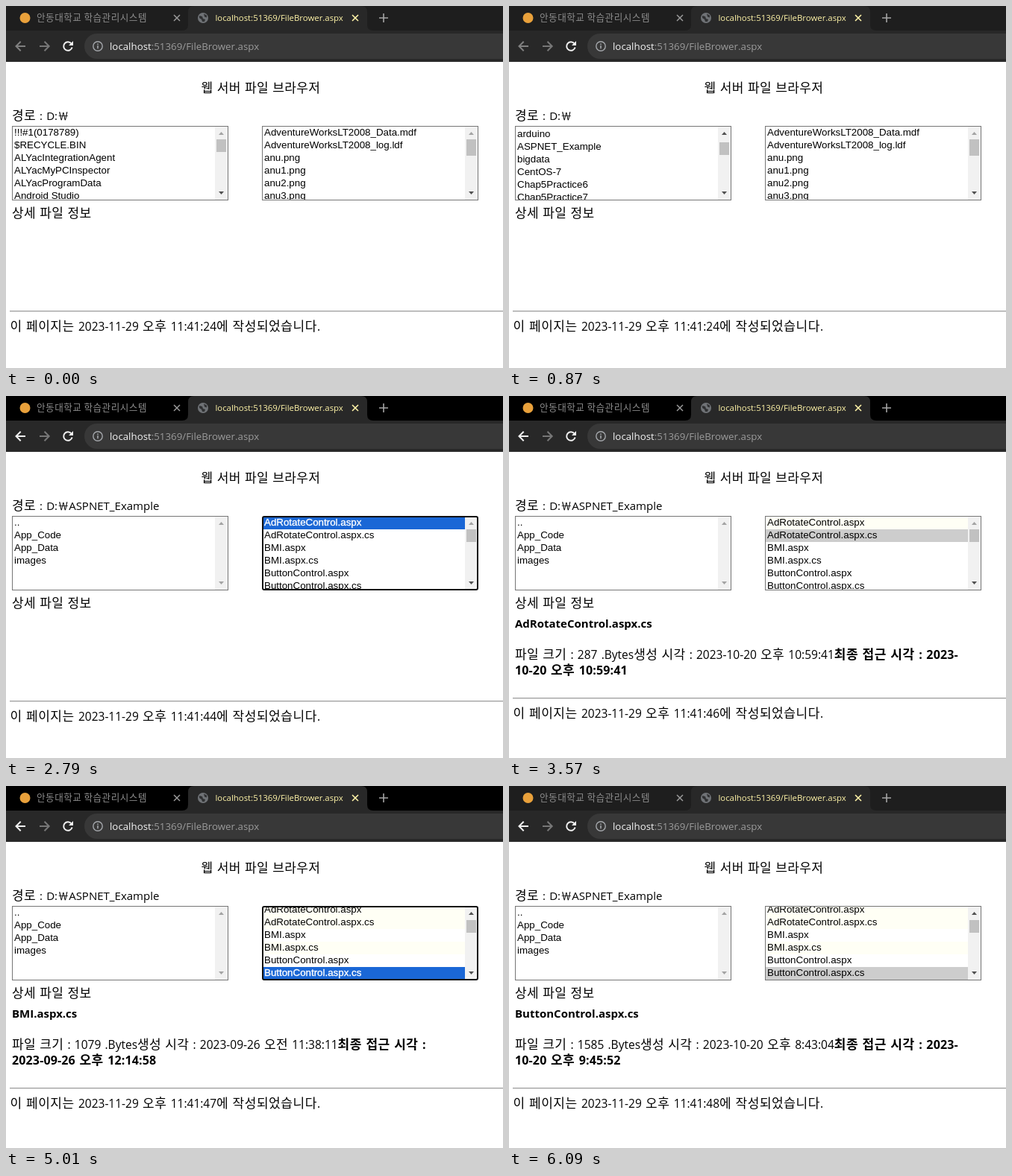
Recreate the animation shown at these times as an HTML page. Size 666 by 486 pixels, loop 6.21 s.

```html
<!DOCTYPE html>
<html lang="ko">
<head>
<meta charset="utf-8">
<title>FileBrower</title>
<style>
  html, body { margin: 0; width: 100%; height: 100%; overflow: hidden; background: #fff; }
  svg { display: block; }
  text { white-space: pre; font: 15.5px "Open Sans", "Noto Sans", sans-serif; word-spacing: 1.2px; }
  .k { font-family: "Noto Sans CJK KR", "Noto Sans CJK", sans-serif; font-size: 17px; font-weight: 350; letter-spacing: .36px; }
  .won { font-family: "Noto Sans CJK KR", "Noto Sans CJK", sans-serif; font-size: 15px; font-weight: 350; }
  .path { font-size: 15px; }
  .foot .k { letter-spacing: .55px; }
  .b { font-weight: 700; font-size: 16px; letter-spacing: .15px; }
  .b .k { font-weight: 700; letter-spacing: .5px; }
  .name { font-weight: 700; font-size: 15px; }
  .row { font: 13.333px "Liberation Sans", Arial, sans-serif; word-spacing: 0; }
  .on { fill: #fff; stroke: #fff; stroke-width: .35px; }
  .url { font-size: 13.3px; word-spacing: 0; }
  .tab { font-size: 11.4px; word-spacing: 0; }
  .tab .k { font-size: 12.6px; letter-spacing: .5px; }
  .ico { fill: none; stroke-width: 2; }
</style>
</head>
<body>
<svg id="stage" width="666" height="486" viewBox="0 0 666 486">
  <rect width="666" height="486" fill="#fff"/>
  <rect id="strip" width="666" height="34"/>
  <path d="M236 33Q244 33 244 25V8Q244 0 252 0H476Q484 0 484 8V25Q484 33 492 33Z" fill="#282828"/>
  <rect y="33" width="666" height="42" fill="#282828"/>
  <rect x="105" y="37" width="600" height="34" rx="17" fill="#383838"/>

  <circle cx="25.500" cy="16" r="7" fill="#e9a13b"/>
  <text id="tab1" class="tab" x="41" y="20" fill="#8c8c8c"></text>
  <path class="ico" d="M225 12l8 8m0-8l-8 8" stroke="#9a9a9a" style="stroke-width:1.5"/>
  <text class="tab" x="280.400" y="20" fill="#fff4a8">localhost:51369/FileBrower.aspx</text>
  <path class="ico" d="M464 12l8 8m0-8l-8 8" stroke="#fff4a8" style="stroke-width:1.6"/>
  <path class="ico" d="M500 16h12m-6-6v12" stroke="#a5a5a5" style="stroke-width:1.6"/>
  <g id="globe">
    <circle cx="264" cy="16" r="7" fill="#6f7276"/>
    <path d="M259 13l4 1 1 3 3 1-1 3-3 0-1-3-3-2zM265 10.500l4 2 0 3-3-1z" fill="#303133"/>
  </g>
  <path id="spin" class="ico" d="M264 10A6 6 0 1 1 258 16" stroke="#9aa0a6"/>

  <path id="back" class="ico" d="M26 54H13.500m6.200-6.200L13.500 54l6.200 6.200"/>
  <path class="ico" d="M45 54h12.700m-6.200-6.200L57.700 54l-6.200 6.200" stroke="#777"/>
  <g id="reload">
    <path class="ico" d="M87.600 50.500A5.800 5.800 0 1 0 88.600 55.500" stroke="#f1f1f1"/>
    <path d="M90 47v6h-6z" fill="#f1f1f1"/>
  </g>
  <path id="stop" class="ico" d="M78 49l10 10m0-10l-10 10" stroke="#f1f1f1"/>
  <circle class="ico" cx="123" cy="54" r="6.200" stroke="#a4a7ab" style="stroke-width:1.4"/>
  <path d="M122.200 53h1.600v4.200h-1.600zM122.200 50.400h1.600v1.600h-1.600z" fill="#a4a7ab"/>
  <text class="url" x="139" y="59" fill="#9b9b9b"><tspan fill="#f4f4f4">localhost</tspan>:51369/FileBrower.aspx</text>

  <g id="page"></g>
</svg>
<script>
const LOOP = 6210, ROW = 17;
const $ = id => document.getElementById(id);

const rootDirs = ['!!!#1(0178789)', '$RECYCLE.BIN', 'ALYacIntegrationAgent', 'ALYacMyPCInspector',
  'ALYacProgramData', 'Android Studio', 'arduino', 'ASPNET_Example', 'bigdata', 'CentOS-7',
  'Chap5Practice6', 'Chap5Practice7'];
const rootFiles = ['AdventureWorksLT2008_Data.mdf', 'AdventureWorksLT2008_log.ldf',
  'anu.png', 'anu1.png', 'anu2.png', 'anu3.png'];
const subDirs = ['..', 'App_Code', 'App_Data', 'images'];
const subFiles = ['AdRotateControl', 'BMI', 'ButtonControl'].flatMap(n => [n + '.aspx', n + '.aspx.cs']);

// Details by file index: size, created, accessed (first and second line)
const info = {
  0: ['613', '2023-10-20 오후 10:59:41', ' 2023-', '10-20 오후 10:59:41'],
  1: ['287', '2023-10-20 오후 10:59:41', ' 2023-', '10-20 오후 10:59:41'],
  3: ['1079', '2023-09-26 오전 11:38:11', '', '2023-09-26 오후 12:14:58'],
  5: ['1585', '2023-10-20 오후 8:43:04', ' 2023-', '10-20 오후 9:45:52']
};

// Each step changes only the listed values
const steps = [
  [0, { sub: false, sec: 24, dim: true, back: false, load: false, pickL: -1, pick: -1, focus: false, show: -1, seen: [], top: 0 }],
  [1440, { dim: false, pickL: 7 }],
  [1500, { load: true }],
  [1560, { sub: true, sec: 44, back: true, pickL: -1 }],
  [1590, { load: false }],
  [2790, { pick: 0, focus: true }],
  [2910, { load: true }],
  [2940, { load: false, focus: false, show: 0, sec: 46 }],
  [3420, { pick: 1, focus: true, seen: [0] }],
  [3450, { load: true }],
  [3540, { focus: false, show: 1 }],
  [3570, { load: false }],
  [4200, { pick: 3, focus: true, seen: [0, 1] }],
  [4320, { load: true }],
  [4350, { load: false, focus: false, show: 3, sec: 47 }],
  [5010, { pick: 5, focus: true, seen: [0, 1, 3], top: 4 }],
  [5040, { load: true }],
  [5130, { focus: false, show: 5, sec: 48 }],
  [5160, { load: false }],
  [6090, { dim: true }]
];

const rich = s => s.replace(/[가-힣]+/g, '<tspan class="k">$&</tspan>')
  .replace('￦', '<tspan class="won">￦</tspan>');
const line = (x, y, s, cls = '') => `<text x="${x}" y="${y}" class="${cls}">${rich(s)}</text>`;
const bold = s => `<tspan class="b">${rich(s)}</tspan>`;
const rect = (x, y, w, h, fill) => `<rect x="${x}" y="${y}" width="${w}" height="${h}" fill="${fill}"/>`;

function list(x, items, o) {
  const { scroll = 0, pick = -1, focus = false, seen = [], thumb = 0, rate = 0 } = o;
  const rows = items.map((name, i) => {
    const y = i * ROW - scroll, on = i === pick;
    const bg = on ? (focus ? '#1a67d6' : '#cdcdcd') : seen.includes(i) ? '#fffff5' : '';
    return (bg ? rect(0, y, 271, ROW, bg) : '') +
      `<text class="row ${on && focus ? 'on' : ''}" x="2" y="${y + 12}">${name}</text>`;
  }).join('');
  const bar = rect(271, 0, 17, 98, '#f1f1f1') +
    (thumb ? rect(273, 17 + Math.round(scroll * rate), 13, thumb, '#c1c1c1') : '') +
    `<path d="M276 11l3.500-4 3.500 4z" fill="${scroll ? '#505050' : '#a3a3a3'}"/>` +
    `<path d="M276 87l3.500 4 3.500-4z" fill="${thumb ? '#505050' : '#a3a3a3'}"/>`;
  const frame = focus
    ? `<rect x="${x + 1}" y="162" width="288" height="98" rx="2" fill="none" stroke="#101010" stroke-width="2"/>`
    : `<rect x="${x + .5}" y="161.5" width="289" height="99" fill="none" stroke="#767676"/>`;
  return `<svg x="${x + 1}" y="162" width="288" height="98">${rows}${bar}</svg>${frame}`;
}

function details(i) {
  const [size, made, tail, rest] = info[i];
  return line(8, 311, subFiles[i], 'name') +
    `<text x="8" y="353">${rich(`파일 크기 : ${size} .Bytes생성 시각 : ${made}`)}${bold('최종 접근 시각 :' + tail)}</text>` +
    `<text x="8" y="374">${bold(rest)}</text>`;
}

function page(s, scroll) {
  const up = s.show < 0 ? 0 : 4;
  const left = s.sub
    ? list(8, subDirs, {})
    : list(8, rootDirs, { scroll, pick: s.pickL, focus: s.pickL >= 0, thumb: 17, rate: .04 });
  const right = s.sub
    ? list(343, subFiles, { scroll: s.top, pick: s.pick, focus: s.focus, seen: s.seen, thumb: 17, rate: .25 })
    : list(343, rootFiles, { thumb: 22 });
  return line(261.5, 116, '웹 서버 파일 브라우저') +
    line(8, 153, '경로 : D:￦' + (s.sub ? 'ASPNET_Example' : ''), 'path') +
    left + right +
    line(8, 284, '상세 파일 정보') +
    (s.show < 0 ? '' : details(s.show)) +
    rect(5, 409 - up, 661, 1, '#9a9a9a') + rect(5, 410 - up, 661, 1, '#e6e6e6') +
    line(5.5, 436 - up, `이 페이지는 2023-11-29 오후 11:41:${s.sec}에 작성되었습니다.`, 'foot');
}

function scrollAt(t) {
  const p = Math.min(1, Math.max(0, (Math.floor(t / 30) * 30 - 690) / 180));
  return Math.round(100 * p * p * (3 - 2 * p));
}

const toggle = (id, on) => $(id).setAttribute('visibility', on ? 'visible' : 'hidden');
let lastKey = '';

function draw(now) {
  const t = now % LOOP;
  const s = Object.assign({}, ...steps.filter(e => e[0] <= t).map(e => e[1]));
  const scroll = scrollAt(t);
  const key = JSON.stringify([s, scroll]);
  if (key !== lastKey) {
    lastKey = key;
    $('strip').setAttribute('fill', s.dim ? '#1e1e1e' : '#000');
    $('back').setAttribute('stroke', s.back ? '#f1f1f1' : '#808080');
    toggle('reload', !s.load);
    toggle('globe', !s.load);
    toggle('stop', s.load);
    toggle('spin', s.load);
    $('page').innerHTML = page(s, scroll);
  }
  $('spin').setAttribute('transform', `rotate(${t * .36} 264 16)`);
}

$('tab1').innerHTML = rich('안동대학교 학습관리시스템');
const start = performance.now();
function tick() {
  draw(performance.now() - start);
  requestAnimationFrame(tick);
}
tick();
</script>
</body>
</html>
```
